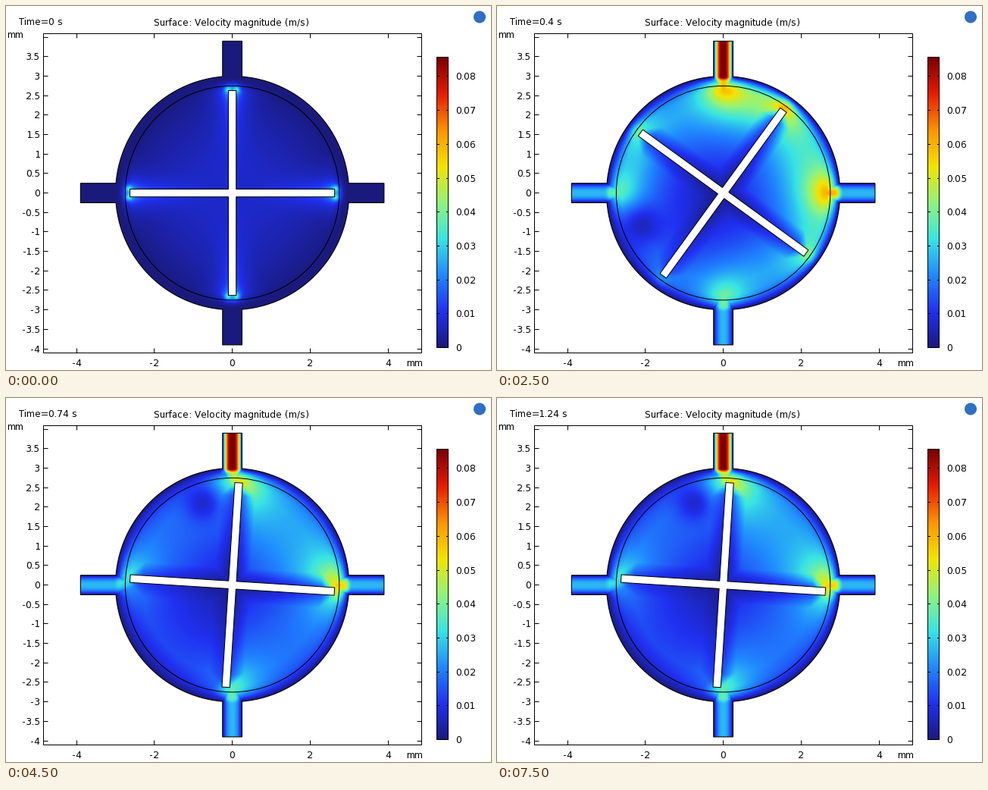
Recreate the animation shown at these times as a matplotlib script. Size 640x480 px, loop 8000 ms.

```python
import numpy as np
import matplotlib.pyplot as plt
from matplotlib.animation import FuncAnimation
from matplotlib.colors import LinearSegmentedColormap
from matplotlib.patches import Circle, Polygon, Rectangle

plt.rcParams.update({"path.snap": False, "text.hinting_factor": 1})

W, H, DPI = 640, 480, 100
CX, CY, S = 298.6, 246.6, 51.35        # stage centre and pixels per mm
FRAMES, STEP = 16, 500
VMAX = 0.0857
PX = 72 / DPI
FONT = dict(family="DejaVu Sans", size=12 * PX, color="black", va="baseline")
RAINBOW = LinearSegmentedColormap.from_list("rainbow_dark", [
    "#1a1a7c", "#2030f0", "#2088ff", "#38e4e4", "#90f47c",
    "#f4e400", "#ff9400", "#e81c00", "#7c0000"], N=512)

# Clockwise flow strength in each quarter, counter-clockwise from the right port.
QUARTERS = (.023, .015, .008, .016)
RIM, PORT, TIP = 3, .25, 2.63          # mm

X0, X1, Y0, Y1 = 97, 501, 45, 449
X, Y = np.meshgrid((np.arange(X0, X1) + .5 - CX) / S,
                   (CY - np.arange(Y0, Y1) - .5) / S)
R = np.hypot(X, Y)


def polar(r, deg):
    return r * np.cos(np.radians(deg)), r * np.sin(np.radians(deg))


def turn(x, y, deg):
    c, s = polar(1, deg)
    return x * c - y * s, x * s + y * c


def to_px(pts):
    return np.asarray(pts) * [S, -S] + [CX, CY]


def housing():
    edge = np.degrees(np.arcsin(PORT / RIM))
    pts = []
    for a in range(0, 360, 90):
        pts += [turn(3.9, -PORT, a), turn(3.9, PORT, a)]
        pts += [polar(RIM, b) for b in np.linspace(a + edge, a + 90 - edge, 60)]
    return to_px(pts)


def blades(deg):
    arm = (.1, -.1), (TIP, -.1), (TIP, .1)
    return to_px([turn(x, y, deg + 90 * k) for k in range(4) for x, y in arm])


def blob(x, y, width):
    return np.exp(-((X - x) ** 2 + (Y - y) ** 2) / width ** 2)


def pair(a, b):
    """Speed between a source and a sink at two angles of the rim."""
    (ax, ay), (bx, by) = polar(2.75, a), polar(2.75, b)
    soft = .45 ** 2
    da = np.sqrt((X - ax) ** 2 + (Y - ay) ** 2 + soft)
    db = np.sqrt((X - bx) ** 2 + (Y - by) ** 2 + soft)
    return np.hypot(ax - bx, ay - by) / (da * db)


def chamber(deg):
    """1 between the blades at deg and deg + 90, open at the tips."""
    depth = np.minimum(*turn(X, Y, -deg))
    opening = .4 * np.clip((R - 2.3) / .4, 0, 1)
    return np.clip((depth + opening) / .45, 0, 1) ** .7


def port_flow(deg, v, reach):
    along, across = turn(X, Y, -deg)
    inside = np.maximum(0, RIM - along) / reach
    side = np.maximum(0, np.abs(across) - .2) / .12
    return v * np.exp(-inside ** 2 - side ** 2)


def start_speed():
    arm = np.maximum(0, np.minimum(np.abs(X), np.abs(Y)) - .1)
    v = np.hypot(.0058 * R * np.exp(-arm / .4),
                 .0072 * np.clip(1 - (R / 2.9) ** 2, 0, 1))
    v *= np.clip((2.95 - R) / .35, 0, 1)
    for a in range(0, 360, 90):
        v += .011 * blob(*polar(TIP, a), .22)
        for side in (-.12, .12):
            v += .014 * blob(*turn(TIP + .03, side, a), .08)
    return v * np.clip((RIM - R) / .25, 0, 1)


def running_speed(deg):
    a = round(deg % 90, 3)
    v2 = (.0048 * R * np.clip((RIM - R) / .7, 0, 1)) ** 2
    for k, q in enumerate(QUARTERS):
        lo, tip = 90 * k, 90 * k + a
        v2 += (q * pair(lo, tip) * chamber(tip - 90)) ** 2
        v2 += (q * pair(tip, lo + 90) * chamber(tip)) ** 2
    v = np.sqrt(v2) * np.exp(-(np.maximum(0, R - 2.9) / .15) ** 2)
    lag = (a + 10) % 90 - 10
    v *= 1 - .65 * blob(*polar(2.25, 115 + 1.6 * lag), .5)

    v = v ** 3 + port_flow(90, .089, .13) ** 3
    for out in (0, 180, 270):
        v += port_flow(out, .027, .3) ** 3
    wall = np.maximum((RIM - R) / .45, 1 - np.minimum(np.abs(X), np.abs(Y)) / PORT)
    return np.cbrt(v) * (1 - (1 - np.clip(wall, 0, 1)) ** 2.3)


fig = plt.figure(figsize=(W / DPI, H / DPI), dpi=DPI, facecolor="white")
ax = fig.add_axes([0, 0, 1, 1])
ax.axis("off")


def line(x, y, x2, y2):
    ax.plot([x, x2], [y, y2], color="black", lw=PX, solid_capstyle="butt")


def frame(x, y, x2, y2):
    ax.add_patch(Rectangle((x, y), x2 - x, y2 - y, fill=False, ec="black", lw=PX))


def label(x, y, s, ha="left"):
    return ax.text(x, y, s, ha=ha, **FONT)


L, T, RT, B = 49.5, 36.5, 548.5, 457.5
frame(L, T, RT, B)
for v in np.arange(-4, 4.1, .5):
    y = np.floor(CY - v * S) + .5
    line(L, y, L + 6, y)
    line(RT - 6, y, RT, y)
    if v < 4:
        label(45, y + 4.2, f"{v:g}", "right")
for v in range(-4, 5, 2):
    x = np.floor(CX + v * S) + .5
    line(x, T, x, T + 6)
    line(x, B - 6, x, B)
    label(x, 475, str(v), "center")
label(1, 42, "mm")
label(528, 475, "mm")
label(195, 26, "Surface: Velocity magnitude (m/s)")
clock = label(17, 25, "")

ax.imshow(np.linspace(VMAX, 0, 383)[:, None], cmap=RAINBOW, vmin=0, vmax=VMAX,
          extent=(569, 584, 451, 68), aspect="auto", interpolation="nearest")
frame(568.5, 67.5, 583.5, 450.5)
for i in range(9):
    y = np.floor(450.5 - i * 44.7) + .5
    line(569, y, 572, y)
    line(581, y, 584, y)
    label(593, y + 4.2, f"{i / 100:g}")

ax.add_patch(Circle((625, 14.5), 8, color="#2f6fc4", lw=0))

ticks = [i * 25 // 6 for i in range(FRAMES)]     # steps of 0.02 s, 7.2 degrees each
fields = [running_speed(7.2 * n) if n else start_speed() for n in ticks]

body = Polygon(housing(), fill=False, ec="black", lw=1.1 * PX, zorder=4)
ax.add_patch(body)
flow = ax.imshow(fields[0], cmap=RAINBOW, vmin=0, vmax=VMAX, zorder=2,
                 extent=(X0, X1, Y1, Y0), aspect="auto", interpolation="nearest")
flow.set_clip_path(body)
ax.add_patch(Circle((CX, CY), 2.75 * S, fill=False, ec="black", lw=PX, zorder=4))
rotor = Polygon(blades(0), fc="white", ec="black", lw=PX, joinstyle="miter", zorder=5)
ax.add_patch(rotor)
ax.set_xlim(0, W)
ax.set_ylim(H, 0)


def draw(i):
    clock.set_text(f"Time={ticks[i] * .02:g} s")
    flow.set_data(fields[i])
    rotor.set_xy(blades(7.2 * ticks[i]))
    return clock, flow, rotor


anim = FuncAnimation(fig, draw, frames=FRAMES, interval=STEP, repeat=True, repeat_delay=0)
plt.show()
```
